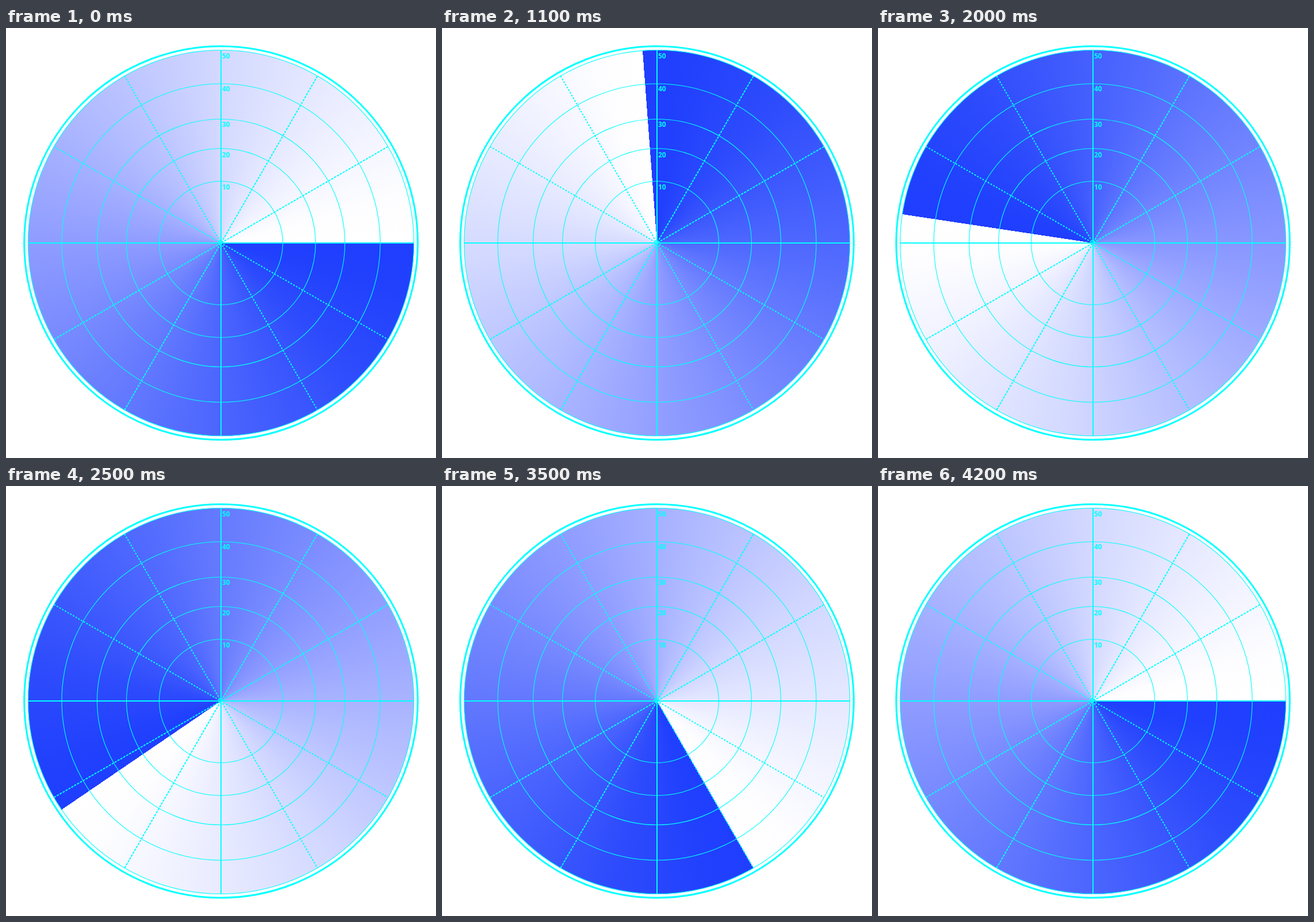
These frames come from a looping animation (748 px wide and 748 px high, 4300 ms). An HTML page:

```html
<!DOCTYPE html>
<html lang="en">
<head>
<meta charset="utf-8">
<title>Radar sweep</title>
<style>
  @property --edge { syntax: "<angle>"; inherits: false; initial-value: 90deg; }
  html, body { margin: 0; width: 100%; height: 100%; overflow: hidden; background: #fff; }
  #sweep {
    position: absolute; left: 38px; top: 38px; width: 672px; height: 672px;
    border-radius: 50%;
    background: conic-gradient(from var(--edge),
      rgb(31 62 255), rgb(33 65 253) 15deg, rgb(46 76 252) 45deg,
      rgb(75 101 254) 90deg, rgb(109 129 254) 135deg, rgb(143 156 255) 180deg,
      rgb(177 187 255) 225deg, rgb(211 217 255) 270deg, rgb(238 240 255) 315deg,
      rgb(253 253 255) 345deg, #fff 360deg);
  }
  svg { position: absolute; left: 0; top: 0; display: block; fill: none; stroke: #0ff; }
  text { font: 600 12px "Noto Sans", "Open Sans", sans-serif; fill: #0ff; stroke: none; }
</style>
</head>
<body>
<div id="sweep"></div>
<svg id="grid" width="100%" height="100%" viewBox="0 0 748 748"></svg>
<script>
  const C = 374, R = 335.5;
  const grid = document.getElementById("grid");

  function add(tag, attrs, label = "") {
    const el = document.createElementNS("http://www.w3.org/2000/svg", tag);
    for (const key in attrs) el.setAttribute(key, attrs[key]);
    el.textContent = label;
    grid.append(el);
  }

  function ring(r, width) {
    add("circle", { cx: C, cy: C, r, "stroke-width": width });
  }

  // A diameter at the given angle, counter-clockwise from east.
  function diameter(deg, dash) {
    const a = deg * Math.PI / 180;
    const dx = R * Math.cos(a), dy = R * Math.sin(a);
    add("line", {
      x1: C + dx, y1: C - dy, x2: C - dx, y2: C + dy,
      "stroke-width": 2, "stroke-dasharray": dash
    });
  }

  ring(342.3, 3);
  for (const [r, label, y] of [
    [107.5, 10, 280.5], [164.5, 20, 224.5], [215.5, 30, 171.5],
    [277, 40, 109.5], [R, 50, 52.5]
  ]) {
    ring(r, 1.1);
    add("text", { x: 376, y }, label);
  }
  for (const deg of [0, 90]) diameter(deg, "none");
  for (const deg of [30, 60]) diameter(deg, "4 1.8");
  for (const deg of [120, 150]) diameter(deg, "3 2.4");

  // 42 equal steps make a full turn; the start pose is held once more at the end.
  const FRAMES = 43, STEP = 360 / 42;
  document.getElementById("sweep").animate(
    { "--edge": ["90deg", `${90 - FRAMES * STEP}deg`] },
    { duration: FRAMES * 100, easing: `steps(${FRAMES}, end)`, iterations: Infinity }
  );
</script>
</body>
</html>
```
